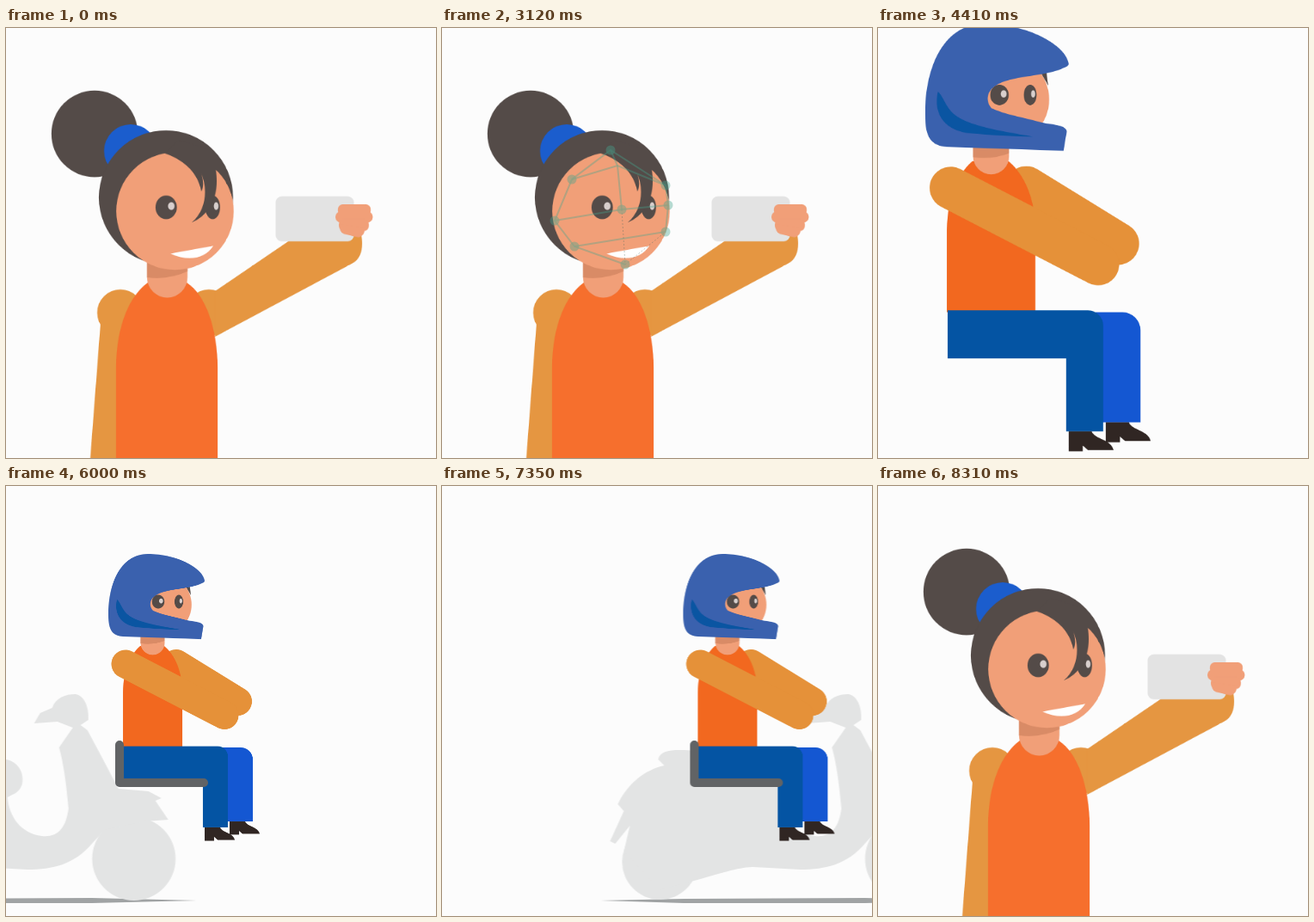
These frames come from a looping animation (500 by 500 pixels, 8.79 s). An HTML page:

```html
<!DOCTYPE html>
<html lang="en">
<head>
<meta charset="utf-8">
<title>Selfie to scooter ride</title>
<style>
  html, body { margin: 0; width: 100%; height: 100%; overflow: hidden; background: #fcfcfc; }
  svg { display: block; width: 100vw; height: 100vh; }
  g, path { transform-box: view-box; }
  #woman, #rider { transform-origin: 250px 250px; }
  .hair { fill: #544b48; }
  .skin { fill: #f19f78; }
  .shade { fill: #d98b66; }
  .glint { fill: #d8cfcd; }
  .sleeve { fill: #e59641; }
  .arm { stroke: #e59139; stroke-width: 33; stroke-linecap: round; }
  .top { fill: #f66f2d; }
  .near { fill: #0454a3; }
  .far { fill: #1457d2; }
  .shoe { fill: #302623; }
  .scooter { fill: #e3e4e4; }
</style>
</head>
<body>
<svg viewBox="0 0 500 500">
  <defs>
    <path id="shoe" class="shoe" d="M0 0H18C20 6 33 6 35 14.5H15L11 11V15.500H0Z"/>
  </defs>

  <g id="woman">
    <circle class="hair" cx="103" cy="123" r="50.300"/>
    <circle cx="145" cy="143" r="31" fill="#1b5dcd"/>
    <g class="sleeve">
      <circle cx="133" cy="331" r="27"/>
      <path d="M110 342L98 500H140V342Z"/>
      <circle cx="236" cy="331" r="27"/>
      <path d="M243 306L340 240H413C416 255 413 267 404 273L243 359Z"/>
    </g>
    <path class="top" d="M128 500V395C128 345 145 310 165 296H210C232 310 246 350 246 395V500Z"/>
    <path class="skin" d="M164 260H211V290A23.500 23.500 0 0 1 164 290Z"/>
    <path class="shade" d="M164 260V290Q190 293 211 283V260Z"/>
    <circle class="hair" cx="186" cy="197" r="78"/>
    <circle class="skin" cx="196.500" cy="213" r="68.300"/>
    <g class="hair">
      <ellipse cx="186.200" cy="208.500" rx="12.400" ry="13.800"/>
      <ellipse cx="240.300" cy="208.500" rx="8.600" ry="13.700"/>
      <path d="M185 146C203 152 223 166 227 190C231 184 229 174 226.500 168C235 186 233 212 216 226C236 218 249 196 244 165C252 172 260 184 263 197C262 180 256 160 240 142L200 130Z"/>
    </g>
    <ellipse class="glint" cx="192.200" cy="207" rx="3.800" ry="4.600"/>
    <ellipse class="glint" cx="244.300" cy="207" rx="2.700" ry="4.600"/>
    <path fill="#fff" d="M191.300 262.300L241 253.300C232 268 212 272 191.300 262.300Z"/>
    <rect x="313.500" y="195.700" width="91" height="52.300" rx="7" fill="#e3e3e3"/>
    <g class="skin">
      <rect x="386" y="205" width="38" height="13" rx="5.500"/>
      <rect x="383" y="213.500" width="43.500" height="12.500" rx="6"/>
      <rect x="387" y="222" width="35" height="14" rx="6"/>
      <path d="M388 228L417 232Q418 241 410 243.500L393 239.500Q387 237 388 228Z"/>
    </g>
  </g>

  <g id="mesh" fill="none" stroke="#45a58e" stroke-opacity=".6" stroke-width="2"></g>
  <g id="card">
    <rect x="206.500" y="14.500" width="204.500" height="128" fill="#f7f8fc" stroke="#e4e5e9"/>
    <path fill="#27b06c" d="M219 83H398V95H219Z"/>
    <path fill="#d0d0d2" d="M219 103H398V109H219ZM219 118H398V124H219Z"/>
  </g>

  <g id="ride">
    <g id="scooter" class="scooter">
      <path fill="#a0a3a4" d="M23 482L120 480L330 479L452 482L330 485L120 485Z"/>
      <circle cx="92" cy="437" r="44"/>
      <circle cx="379" cy="433.500" r="48.500"/>
      <path d="M90 318C92 306 110 306 135 308L230 318C245 320 252 335 249 347C245 358 238 358 232 362C234 385 248 404 272 407C290 409 300 398 303 375C300 340 296 318 292 304L308 281L290 274L263 276L270 264L284 258C288 246 300 242 311 242C322 244 327 258 326 272L317 278L325 284L340 312L361 352L396 355L411 363L404 366L419 388L392 390L345 400L331 415C310 440 285 446 255 446L200 443C180 444 165 450 128 460L92 470L50 425L57 395L40 416L34 413L50 378L43 370C55 345 75 330 97 325Z"/>
    </g>
    <g id="rider">
      <path class="arm" d="M198 206.500L269.500 250.500"/>
      <path d="M136 304V240C136 215 145 195 156 186H184C196 196 205 215 205 240V304Z" fill="#f2681f"/>
      <path class="skin" d="M156.500 165H184.500V182.500A14 14 0 0 1 156.500 182.500Z"/>
      <path class="shade" d="M156.500 165V183Q172 185 184.500 180V165Z"/>
      <path class="arm" d="M139 207L254 266.500"/>
      <path class="far" d="M240 304H273A14 14 0 0 1 287 318V390H257V330H240Z"/>
      <path class="near" d="M136.500 302.500H246A12 12 0 0 1 258 314.500V397H229V340H136.500Z"/>
      <use href="#shoe" x="260" y="390"/>
      <use href="#shoe" x="231" y="397"/>
      <circle class="skin" cx="181" cy="138" r="34.800"/>
      <path class="hair" d="M208 115L213.500 115L215 127Z"/>
      <ellipse class="hair" cx="177" cy="134.500" rx="7.200" ry="8"/>
      <ellipse class="hair" cx="201" cy="134.500" rx="5" ry="8"/>
      <ellipse class="glint" cx="180.300" cy="133.700" rx="2.300" ry="2.900"/>
      <ellipse class="glint" cx="203.300" cy="133.700" rx="1.600" ry="2.900"/>
      <path fill="#3a61ae" d="M231 110C229 96 200 79 165 79C135 79 119 110 119 150C119 168 124 174 136 175L227 178L229.500 163C229 158 220 158 210 156C195 152 182 150 171 145C165 138 168 130 176 126C190 119 215 120 228 113Q231 112 231 110Z"/>
      <path fill="#0a55a2" d="M129 132C125 150 135 163 155 164.500C172 166 188 167 203 167C175 162 148 158 139 147C134 141 132 134 129 132Z"/>
    </g>
    <path id="seat" d="M132 301V345H230" pathLength="1" fill="none" stroke="#616365" stroke-width="10" stroke-linecap="round" stroke-linejoin="round" stroke-dasharray="1 2"/>
  </g>
</svg>
<script>
  const LOOP = 8790;
  const $ = id => document.getElementById(id);

  // Face mesh: nodes plus a few polylines joining them.
  const nodes = [[196, 142], [151, 176], [131, 224], [154, 254], [213, 275],
                 [260, 237], [263, 206], [260, 183], [209, 211]];
  const knot = [204, 160];
  const line = (pts, extra = '') => `<polyline points="${pts.join(' ')}" ${extra}/>`;
  const pick = (...ids) => ids.map(i => nodes[i]);
  const dots = 'stroke="#4a6b62" stroke-width="1" stroke-dasharray="2 2"';
  $('mesh').innerHTML =
    line(pick(7, 0, 1, 2, 3, 4)) +
    line(pick(7, 6, 5, 3)) +
    line(pick(2, 8, 6)) +
    line([nodes[1], knot, nodes[7]]) +
    line([nodes[0], knot, nodes[8]]) +
    line(pick(8, 4, 5), dots) +
    nodes.map(([x, y]) =>
      `<circle cx="${x}" cy="${y}" r="5.500" fill="#45a58e" fill-opacity=".65" stroke="none"/>`).join('');

  // Steps are [ms, value, easing towards the next step].
  function play(id, prop, steps) {
    const all = [[0, steps[0][1]], ...steps, [LOOP, steps[steps.length - 1][1]]];
    $(id).animate(
      all.map(([ms, value, easing = 'linear']) => ({ offset: ms / LOOP, [prop]: value, easing })),
      { duration: LOOP, iterations: Infinity });
  }
  const shift = x => `translate(${x}px, 0px)`;
  const zoom = s => `scale(${s})`;
  const SWAP = 4134;
  const quadIn = 'cubic-bezier(.33, 0, .67, .33)';
  const softOut = 'cubic-bezier(.33, .54, .67, 1)';

  play('woman', 'transform', [[3744, zoom(1), quadIn], [SWAP, zoom(5), 'step-end'], [5000, zoom(1)]]);
  play('woman', 'opacity', [[SWAP, 1], [SWAP, 0], [8130, 0], [8310, 1]]);

  play('mesh', 'opacity', [[540, 0], [810, 1], [3000, 1], [3300, 0]]);
  play('card', 'transform', [[1740, shift(-444)], [1980, shift(0)]]);
  play('card', 'opacity', [[2700, 1], [2970, 0]]);

  play('ride', 'opacity', [[SWAP, 0], [SWAP, 1], [7830, 1], [7830, 0]]);
  play('ride', 'transform', [[7125, shift(0)], [7825, shift(500)]]);
  play('rider', 'transform', [[SWAP, zoom(5), softOut], [4536, zoom(1)]]);
  play('seat', 'opacity', [[5235, 0], [5235, 1]]);
  play('seat', 'strokeDashoffset', [[5235, 1], [5625, 0]]);
  play('scooter', 'transform', [[5640, shift(-462)], [6360, shift(0)]]);
</script>
</body>
</html>
```
